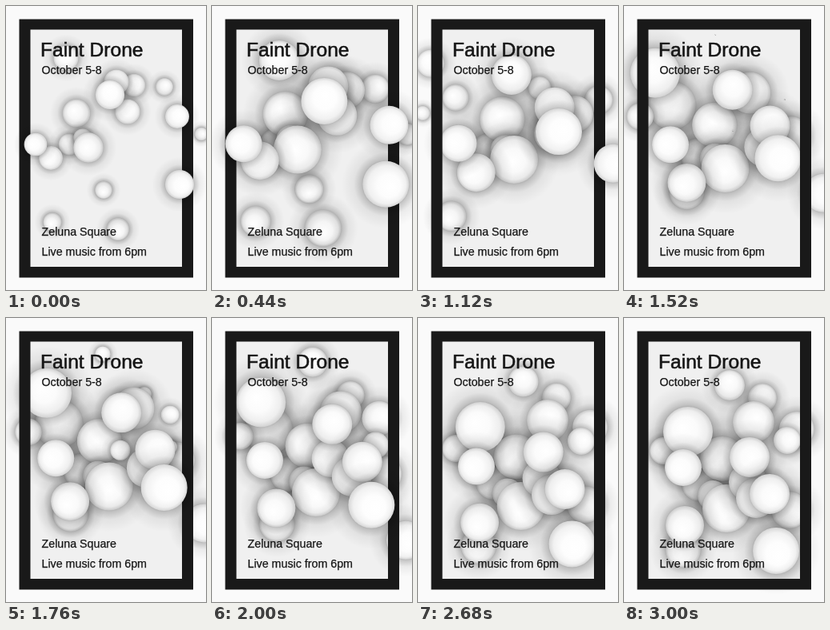
An HTML page with a canvas for the animation above (3.04 s loop, 250 by 355 pixels).

```html
<!DOCTYPE html>
<html lang="en">
<head>
<meta charset="utf-8">
<title>Faint Drone</title>
<style>
  html, body { margin: 0; width: 100%; height: 100%; overflow: hidden; background: #fafafa; }
  canvas, svg { position: absolute; left: 0; top: 0; width: 250px; height: 355px; }
  text { font: 14.25px "Liberation Sans", Arial, sans-serif; fill: #161616; stroke: #161616; stroke-width: .25; }
  .title { font-size: 24.6px; stroke-width: .55; }
</style>
</head>
<body>
<canvas id="stage"></canvas>
<svg viewBox="0 0 250 355">
  <text class="title" x="43" y="63">Faint Drone</text>
  <text x="44.5" y="85">October 5-8</text>
  <text x="44.5" y="287">Zeluna Square</text>
  <text x="44.5" y="312">Live music from 6pm</text>
</svg>
<script>
const LOOP = 3040, STEP = 40;
const BULGE = 0.18;              // how far each arc bows, relative to its length
const HUB = { x: 130, y: 175 };  // middle of the cluster, where least light arrives
const canvas = document.getElementById('stage');
const ctx = canvas.getContext('2d');
const ratio = window.devicePixelRatio || 1;
canvas.width = 250 * ratio;
canvas.height = 355 * ratio;
ctx.scale(ratio, ratio);

const clamp = v => Math.min(1, Math.max(0, v));
const smooth = v => { v = clamp(v); return v * v * (3 - 2 * v); };

// A ball sweeps clockwise from (x0, y0) to (x1, y1).
// `front` is the time span in which it passes before the border.
const balls = [];
function ball(x0, y0, x1, y1, r, { birth = -350, death = Infinity, front = [0, 0] } = {}) {
  balls.push({ x0, y0, x1, y1, r, birth, death, front });
}

const early = { death: 1100 }, fading = { death: 1500 };
const mid = { birth: 800 }, late = { birth: 1450 };

// Listed from back to front.
ball(244, 160, 244, 166, 14, early);
ball(122, 230, 126, 212, 18, early);
ball(140, 279, 136, 255, 23, early);
ball(58, 270, 25, 230, 19, fading);
ball(198, 101, 250, 180, 18, fading);
ball(79, 173, 94, 207, 22);
ball(20, 105, 78, 165, 30, mid);
ball(-20, 135, 49, 166, 17, mid);
ball(45, 185, 74, 290, 22, mid);
ball(88, 134, 123, 176, 28);
ball(96, 165, 111, 222, 19);
ball(160, 99, 207, 240, 23);
ball(168, 90, 173, 100, 18, late);
ball(140, 95, 162, 130, 26, mid);
ball(175, 110, 216, 139, 22, late);
ball(215, 170, 204, 153, 17, late);
ball(70, 10, 132, 84, 19, late);
ball(103, 177, 128, 238, 30);
ball(56, 190, 76, 259, 24);
ball(90, 130, 155, 205, 24, late);
ball(152, 132, 165, 225, 25);
ball(75, 65, 157, 174, 25);
ball(138, 95, 182, 220, 25);
ball(-30, 65, 80, 142, 31, mid);
ball(37, 173, 74, 187, 23, { front: [0, 1000] });
ball(217, 223, 222, 223, 29, { death: 1100, front: [0, 1100] });
ball(214, 138, 215, 330, 24, { death: 2400, front: [0, 1320] });
ball(130, 111, 190, 291, 29, { front: [1600, 2280] });

function pose(b, t) {
  const u = smooth(t / LOOP);
  const bow = 4 * u * (1 - u) * BULGE;
  const dx = b.x1 - b.x0, dy = b.y1 - b.y0;
  return {
    x: b.x0 + dx * u + dy * bow,
    y: b.y0 + dy * u - dx * bow,
    r: b.r * smooth((t - b.birth) / 600) * smooth((b.death - t) / 400)
  };
}

function disc(x, y, r, gradient, stops) {
  stops.forEach(([at, color]) => gradient.addColorStop(at, color));
  ctx.fillStyle = gradient;
  ctx.beginPath();
  ctx.arc(x, y, r, 0, 2 * Math.PI);
  ctx.fill();
}

const black = alpha => `rgba(0,0,0,${alpha})`;
const gray = level => `rgb(${level},${level},${level})`;

// `near` runs from 0 at the back of the cluster to 1 at its front.
function drawBall({ x, y, r }, near) {
  if (r < 0.5) return;
  const reach = r * 1.9;
  disc(x, y, reach, ctx.createRadialGradient(x, y, r * 0.85, x, y, reach), [
    [0, black(0.4)], [0.2, black(0.2)], [0.5, black(0.06)], [1, black(0)]
  ]);

  // The bright side faces away from the hub.
  const dx = x - HUB.x, dy = y - HUB.y;
  const shift = 0.3 * r / Math.max(60, Math.hypot(dx, dy));
  const light = ctx.createRadialGradient(x + dx * shift, y + dy * shift, 0, x, y, r);
  const edge = 180 + 35 * near;
  disc(x, y, r, light, [
    [0, '#fff'], [0.5, gray(244 + 9 * near)], [0.82, gray(222 + 20 * near)], [1, gray(edge)]
  ]);
}

function draw(now) {
  const t = Math.floor(now % LOOP / STEP) * STEP;
  const layer = inFront => balls.forEach((b, i) => {
    const isFront = t >= b.front[0] && t < b.front[1];
    if (isFront === inFront) drawBall(pose(b, t), i / balls.length);
  });

  ctx.fillStyle = '#fafafa';
  ctx.fillRect(0, 0, 250, 355);
  ctx.fillStyle = '#f0f0f0';
  ctx.fillRect(30, 29, 191, 297);
  layer(false);
  ctx.fillStyle = '#191919';
  ctx.beginPath();
  ctx.rect(16.5, 16.5, 217.5, 323);
  ctx.rect(30.5, 29.5, 189.5, 296.5);
  ctx.fill('evenodd');
  layer(true);
}

const start = performance.now();
function tick() {
  draw(performance.now() - start);
  requestAnimationFrame(tick);
}
tick();
</script>
</body>
</html>
```
